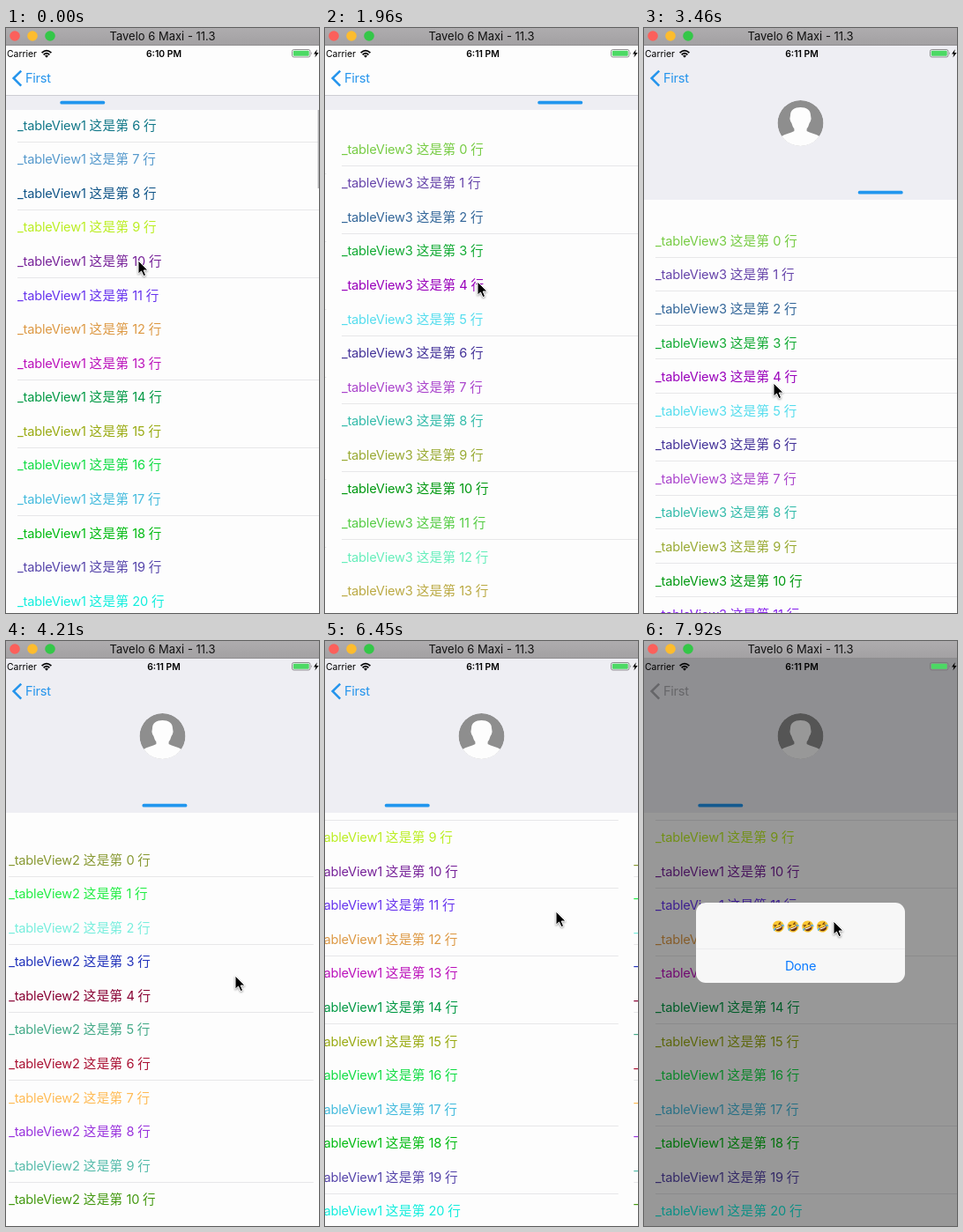
An HTML page for the animation above (8000 ms loop, 355 by 664 pixels).

```html
<!DOCTYPE html>
<html lang="zh-CN">
<head>
<meta charset="utf-8">
<title>Nested tables</title>
<style>
  html, body { margin: 0; width: 100%; height: 100%; overflow: hidden; background: #fdfdfd; }
  svg { display: block; }
  text { font-family: Inter, "Noto Sans CJK SC", "Noto Sans CJK", sans-serif; white-space: pre; }
  .row { font-size: 14.6px; letter-spacing: -.18px; }
  .cjk { font-family: "Noto Sans CJK SC", "Noto Sans CJK", sans-serif; letter-spacing: .3px; }
  .sep { fill: #e7e7e9; }
  .status { font-size: 10.4px; }
  .mid { text-anchor: middle; }
  .label { font-size: 14.6px; letter-spacing: -.3px; }
  #cursor { filter: drop-shadow(0 1px 1px #0006); }
</style>
</head>
<body>
<svg width="355" height="664" viewBox="0 0 355 664">
  <defs>
    <linearGradient id="bar" x2="0" y2="1">
      <stop stop-color="#aeacae"/><stop offset="1" stop-color="#a3a1a3"/>
    </linearGradient>
    <clipPath id="round"><circle cx="177.5" cy="108" r="26"/></clipPath>
    <g id="laugh" transform="rotate(-25)">
      <circle r="6.6" fill="#fbc733"/>
      <path d="M-4.6 .2Q0 1.6 4.6 .2Q4.2 5.2 0 5.2T-4.6 .2Z" fill="#6a3510"/>
      <path d="M-3.8 .9Q0 2.2 3.8 .9L3.4 2.2Q0 3-3.4 2.2Z" fill="#fff"/>
      <path d="M-4.3-3.4L-1.6-2.1L-4.3-1.2M4.3-3.4L1.6-2.1L4.3-1.2" fill="none" stroke="#6a3510" stroke-width=".9"/>
      <path d="M-6.6 2.6Q-6.8-.2-3.9-.4Q-3.8 2.6-6.6 2.6ZM6.6 2.6Q6.8-.2 3.9-.4Q3.8 2.6 6.6 2.6Z" fill="#56b5ea"/>
    </g>
  </defs>

  <rect width="355" height="664" fill="#fdfdfd"/>
  <g id="tables"></g>
  <rect id="scrollbar" x="353.6" y="93" width="1.4" height="89" fill="#b2b2b4"/>

  <g id="header">
    <rect y="-200" width="355" height="395" fill="#eeeef3"/>
    <g clip-path="url(#round)">
      <circle cx="177.5" cy="108" r="26" fill="#8e8e8e"/>
      <path d="M177.5 90C184 90 189 93 189 99L189.6 103Q189 106.5 187.6 108Q186.4 112.5 184.6 114.5V117Q187 118.6 193 120.2Q199 122 202 126V136H153V126Q156 122 162 120.2Q168 118.6 170.4 117V114.5Q168.6 112.5 167.4 108Q166 106.5 165.4 103L166 99C166 93 171 90 177.5 90Z" fill="#fdfdfd"/>
    </g>
    <rect id="marker" y="184.8" width="51" height="3.8" rx="1.9" fill="#2196ee"/>
  </g>
  <g id="nav">
    <rect y="19" width="355" height="57" fill="#fdfdfd"/>
    <rect y="76" width="355" height="1" fill="#cdcdd3"/>
  </g>
  <g id="back">
    <path d="M17.2 48.6L8.6 57L17.2 65.6" fill="none" stroke-width="2.5"/>
    <text class="label" x="22" y="62.3" stroke="none">First</text>
  </g>

  <rect id="dim" y="19" width="355" height="645"/>
  <g id="status">
    <text class="status" x="1" y="33">Carrier</text>
    <path d="M40.6 28.2Q46 23 51.4 28.2M42.6 30.3Q46 27.2 49.4 30.3" fill="none" stroke="#000" stroke-width="1.7"/>
    <path d="M44 31.6Q46 30 48 31.6L46 33.8Z"/>
    <text id="clock" class="status mid" x="179" y="33" font-weight="600"></text>
    <rect x="324.5" y="24.5" width="20.5" height="8.5" rx="2" fill="none" stroke="#777" stroke-width=".8"/>
    <rect x="325.8" y="25.8" width="17.9" height="5.9" rx="1" fill="#4cd964"/>
    <path d="M346.2 27.2Q347.6 28.7 346.2 30.2Z" fill="#777"/>
    <path d="M352.8 24.2L349 29.5H351.4L350.4 33.4L354.6 28H352Z"/>
  </g>

  <g id="alert">
    <rect x="59" y="297" width="237" height="91" rx="11" fill="#f7f7f7"/>
    <rect x="59" y="349" width="237" height="1" fill="#ececee"/>
    <use href="#laugh" x="152.3" y="324"/><use href="#laugh" x="169" y="324"/>
    <use href="#laugh" x="185.7" y="324"/><use href="#laugh" x="202.4" y="324"/>
    <text class="label mid" x="177.5" y="374" fill="#0a7aff">Done</text>
  </g>

  <rect width="355" height="19" fill="url(#bar)"/>
  <rect y="19" width="355" height="1" fill="#8f8d8f"/>
  <circle cx="10" cy="9" r="5.8" fill="#fc605b"/>
  <circle cx="30" cy="9" r="5.8" fill="#fdbc2e"/>
  <circle cx="50" cy="9" r="5.8" fill="#34c748"/>
  <text class="mid" x="177.5" y="14" font-size="13" fill="#111">Tavelo 6 Maxi - 11.3</text>

  <path id="cursor" d="M0 0V15.2L3.5 12L6 17.6L8.6 16.5L6.2 11H11Z" stroke="#fff" stroke-linejoin="round"/>
</svg>

<script>
const LOOP = 8000, STEP = 149.43;
const PITCH = 38.57, PAGE = 363, RISE = 102;
const $ = id => document.getElementById(id);

// Progress from 0 to 1 over a span of steps, and shapes built on it.
const ramp = (s, from, span) => Math.min(1, Math.max(0, (s - from) / span));
const glide = (s, from, span = 5) => 1 - (1 - ramp(s, from, span)) ** 3;
const bump = (s, from, span) => Math.sin(Math.PI * ramp(s, from, span));
const smooth = u => u * u * (3 - 2 * u);

const pull = s => 104.1 * glide(s, 17.5);
const rise = s => Math.min(RISE, pull(s));
const pageAt = s => glide(s, 2.76) + glide(s, 9.27) - glide(s, 24.5) - glide(s, 40.07);

// Each table: first row built, row colours, and the height of row 0 at a step.
const tables = [
  { first: 6, colors: '178 59c 158 be2 729 63e d94 b1b 094 9a1 1d4 4bd 0b1 54a 1ed',
    top: s => -121.62 - 3.22 * glide(s, 0, 3) },
  { first: 0, colors: '893 2e4 7ed 23b 803 4a8 a13 fb5 93d 5ba 491 5b5 d14 2c3',
    top: s => 145.72 + rise(s) + 40 * bump(s, 32, 5) },
  { first: 0, colors: '7c4 64a 369 1a3 90b 5de 439 a4c 3ba 9a3 091 5c4 6eb ba4',
    top: s => 136.87 + pull(s) }
];

// Step, x, y where the pointer starts or ends a gesture.
const stops = [[0, 150, 264], [3, 285, 285], [6, 37, 291], [10, 320, 290], [13, 173, 288],
  [18, 152, 262], [23, 147, 403], [28, 260, 380], [32, 165, 209], [36, 162, 390],
  [40, 100, 330], [43, 262, 307], [50, 215, 318]];

function pointer(s) {
  const i = stops.findIndex(stop => stop[0] > s);
  if (i < 0) return stops.at(-1).slice(1);
  const [s0, x0, y0] = stops[i - 1], [s1, x1, y1] = stops[i];
  const u = smooth(ramp(s, s0, s1 - s0));
  return [x0 + (x1 - x0) * u, y0 + (y1 - y0) * u];
}

function set(el, attrs) {
  for (const key in attrs) el.setAttribute(key, attrs[key]);
}

function node(name, attrs, parent) {
  const el = document.createElementNS('http://www.w3.org/2000/svg', name);
  set(el, attrs);
  return parent.appendChild(el);
}

tables.forEach((table, n) => {
  table.group = node('g', {}, $('tables'));
  table.rows = table.colors.split(' ').map((color, i) => {
    const k = table.first + i;
    const sep = node('rect', { class: 'sep', x: 13, width: 345.5, height: 1 }, table.group);
    const text = node('text', { class: 'row', x: 13, fill: '#' + color }, table.group);
    text.innerHTML = `_tableView${n + 1} <tspan class="cjk">这是第</tspan> ${k} <tspan class="cjk">行</tspan>`;
    return { k, sep, text };
  });
});

function drawTable(table, n, s, page) {
  const top = table.top(s);
  // Hairlines between pixel rows drop out, except in the last table's slow scroll.
  const all = n === 2 && s >= 18;
  set(table.group, { transform: `translate(${(n - page) * PAGE} 0)` });
  for (const { k, sep, text } of table.rows) {
    const mid = top + k * PITCH, line = mid + PITCH / 2, y = Math.floor(line);
    set(text, { y: Math.round(mid + 5.9) });
    set(sep, { y, visibility: all || line - y < .43 ? 'visible' : 'hidden' });
  }
}

function draw(s) {
  const page = pageAt(s), open = rise(s);
  tables.forEach((table, n) => drawTable(table, n, s, page));
  // This cell is reused with a new colour after leaving the screen.
  set(tables[2].rows[11].text, { fill: s < 22 ? '#5c4' : '#82e' });

  set($('header'), { transform: `translate(0 ${open - RISE})` });
  set($('marker'), { x: 61.3 + 90.7 * page });
  set($('nav'), { opacity: 1 - open / RISE });
  set($('scrollbar'), { opacity: 1 - ramp(s, 0, 3) });
  $('clock').textContent = s < 9 ? '6:10 PM' : '6:11 PM';

  const shade = ramp(s, 50, 3), shown = ramp(s, 50, 2), zoom = 1.2 - .2 * shown;
  const tint = shade > 0 ? '#a9a9ae' : '#2494ec';
  set($('back'), { fill: tint, stroke: tint });
  set($('dim'), { opacity: .4 * shade });
  set($('alert'), {
    opacity: shown,
    transform: `translate(177.5 342.5) scale(${zoom}) translate(-177.5 -342.5)`
  });
  set($('cursor'), { transform: `translate(${pointer(s)})` });
}

let last = -1;
const start = performance.now();
function tick() {
  const t = (performance.now() - start) % LOOP;
  const s = Math.min(53, Math.floor(t / STEP + .06));
  if (s !== last) draw(last = s);
  requestAnimationFrame(tick);
}
tick();
</script>
</body>
</html>
```
